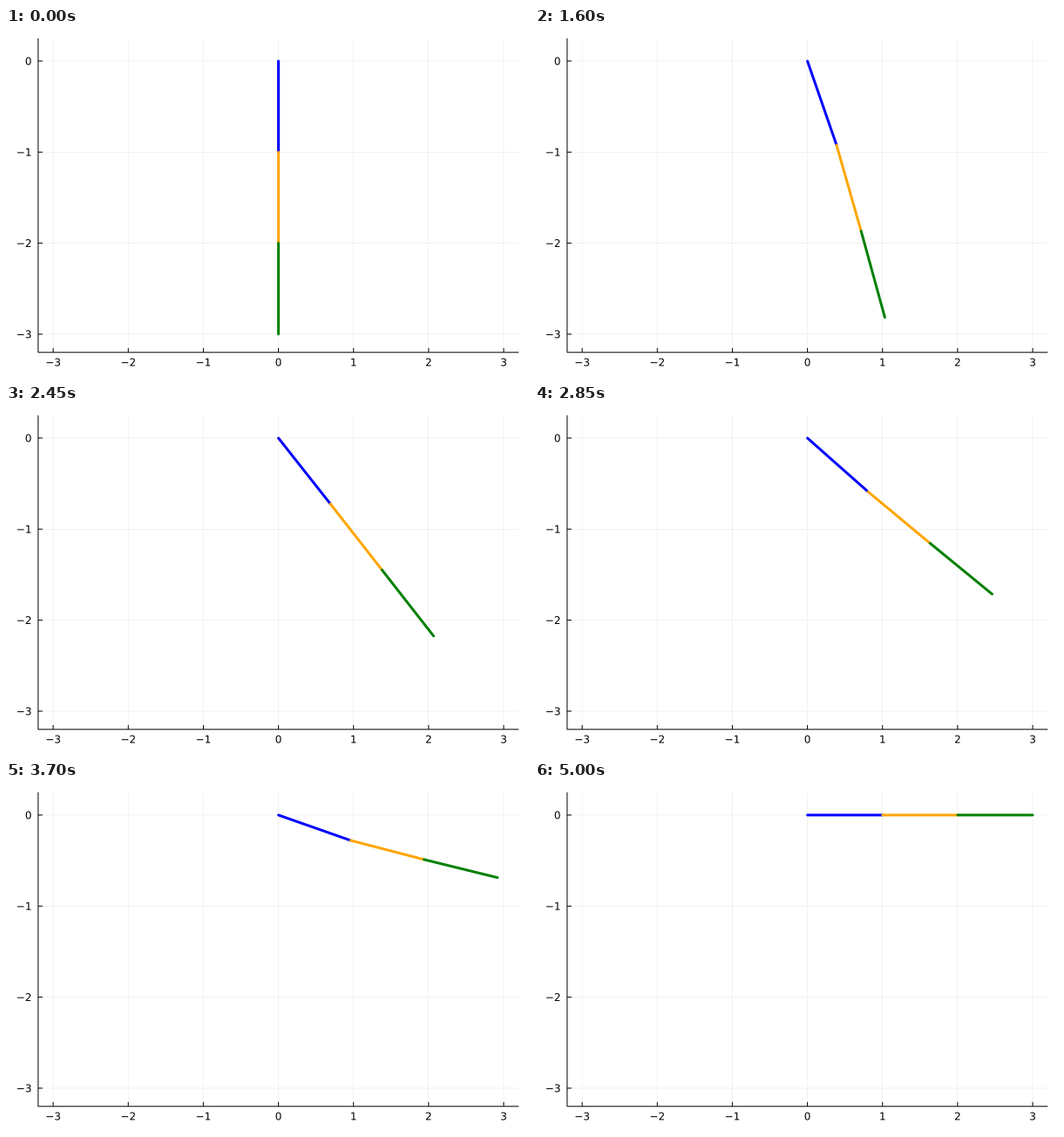
A matplotlib script for the animation above (5050 ms loop, 600x400 px).

```python
import numpy as np
import matplotlib.pyplot as plt
from matplotlib.animation import FuncAnimation
from matplotlib.patches import PathPatch
from matplotlib.textpath import TextPath
from matplotlib.transforms import Affine2D

W, H, DPI = 600, 400, 100
FRAMES, INTERVAL = 101, 50
PX = 72 / DPI  # one pixel in points

# Plot box in pixels and its data limits
LEFT, RIGHT, TOP, BOTTOM = 36.9, 588.19, 11.81, 371.8
XMIN, XMAX, YMIN, YMAX = -3.2, 3.2, -3.2, 0.25
TICK = 5
FONT = 12

COLORS = ["blue", "orange", "green"]
# Deviation of each link from the plain cubic swing
BASE = np.array([1.1, -2.45, -3.2])
LAG = np.array([-0.2, -2.05, -1.5])

plt.rcParams["font.family"] = "DejaVu Sans"
plt.rcParams["path.snap"] = False  # keep lines at sub-pixel positions

fig = plt.figure(figsize=(W / DPI, H / DPI), dpi=DPI, facecolor="white")
ax = fig.add_axes([0, 0, 1, 1])
ax.set_xlim(0, W)
ax.set_ylim(H, 0)
ax.axis("off")


def px(x):
    return LEFT + (x - XMIN) / (XMAX - XMIN) * (RIGHT - LEFT)


def py(y):
    return TOP + (YMAX - y) / (YMAX - YMIN) * (BOTTOM - TOP)


def stroke(xs, ys, width=1, color="black", cap="butt", **style):
    return ax.plot(xs, ys, color=color, linewidth=width * PX,
                   solid_capstyle=cap, solid_joinstyle="miter", **style)[0]


def label(n, x, y, align):
    """Number n, centred vertically on y; align 0.5 centres it, 1 ends it at x."""
    text = str(n).replace("-", "\u2212")
    width = FONT * (0.636 + 0.838 * (n < 0))  # digit and minus advances
    place = Affine2D().scale(1, -1).translate(x - align * width,
                                              y + 0.365 * FONT)
    ax.add_patch(PathPatch(TextPath((0, 0), text, size=FONT), color="black",
                           linewidth=0, transform=place + ax.transData))


for n in range(-3, 4):
    x = px(n)
    stroke([x, x], [TOP, BOTTOM], 0.5, alpha=0.1, zorder=1)
    stroke([x, x], [BOTTOM, BOTTOM - TICK])
    label(n, x, 383, 0.5)

for n in range(-3, 1):
    y = py(n)
    stroke([LEFT, RIGHT], [y, y], 0.5, alpha=0.1, zorder=1)
    stroke([LEFT, LEFT + TICK], [y, y])
    label(n, 29.5, y, 1)

stroke([LEFT, LEFT, RIGHT], [TOP, BOTTOM, BOTTOM])

links = [stroke([], [], 3, color, "round", zorder=3) for color in COLORS]


def link_angles(s):
    """Angles from straight down, for progress s in 0..1."""
    swing = np.pi / 2 * s * s * (3 - 2 * s)
    bend = (s * (1 - s)) ** 2 * (1 - 2 * s)
    return swing + bend * (BASE + LAG * (1 - 2 * s) ** 2)


def update(frame):
    angles = link_angles(frame / (FRAMES - 1))
    x = px(np.append(0, np.cumsum(np.sin(angles))))
    y = py(np.append(0, -np.cumsum(np.cos(angles))))
    for i, link in enumerate(links):
        link.set_data(x[i:i + 2], y[i:i + 2])
    return links


anim = FuncAnimation(fig, update, frames=FRAMES, interval=INTERVAL,
                     repeat=True, repeat_delay=0)
plt.show()
```
